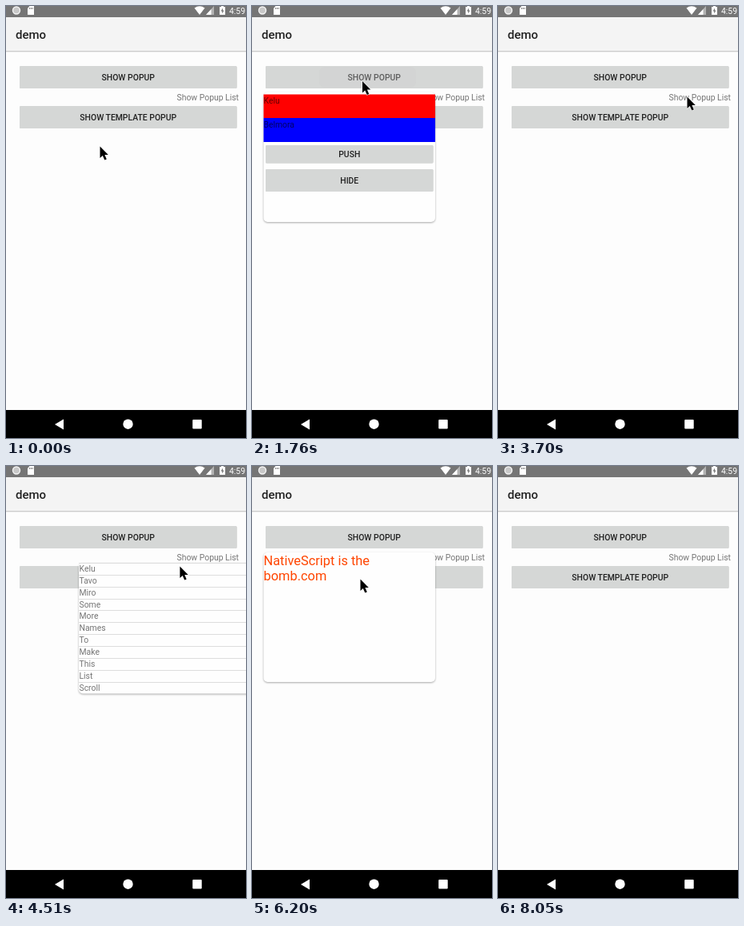
Animation of 300x540 px, one loop 8.15 s. Source, as an HTML page:

```html
<!DOCTYPE html>
<html lang="en">
<head>
<meta charset="utf-8">
<title>Popup demo</title>
<style>
  html, body { margin: 0; width: 100%; height: 100%; overflow: hidden; background: #fdfdfd; }
  svg { display: block; width: 300px; height: 540px; font: 10.4px Roboto, sans-serif; }
  .button rect { fill: #d5d7d6; filter: drop-shadow(0 .5px .5px #0003); }
  .button text { font-weight: 500; text-anchor: middle; fill: #212121; }
  .pressed rect { fill: #d0d1d1; filter: drop-shadow(0 2px 1.5px #0006); }
  .label { fill: #757575; }
  .tinted { fill: #000; opacity: .6; }
  .card { fill: #fefefe; filter: drop-shadow(0 1px 1px #0005); }
</style>
</head>
<body>
<svg viewBox="0 0 300 540">
  <rect width="300" height="540" fill="#fdfdfd"/>
  <rect y="56" width="300" height="1" fill="#ccc"/>
  <rect y="57" width="300" height="1" fill="#ececec"/>
  <rect y="14" width="300" height="42" fill="#f4f4f4"/>
  <text x="12" y="41" font-size="15" font-weight="500" fill="#212121">demo</text>

  <g id="status" fill="#fff">
    <rect width="300" height="14" fill="#757575"/>
    <circle cx="13" cy="5.5" r="4.5" fill="#c8c8c8" stroke="#f4f4f4" stroke-width="1.4"/>
    <path d="M29.5 0H35V11H27V3Z"/>
    <path d="M29.6 2V4M31.4 2V4M33.2 2V4" stroke="#757575" stroke-width=".9"/>
    <path d="M235.500 2.500Q242 -2 248.500 2.500L242 11Z"/>
    <path d="M260 0V11H250Z" opacity=".45"/>
    <path d="M256.500 4V11H250Z"/>
    <path d="M269 0H272V1H274V11H267V1H269Z"/>
    <path d="M271 2.500L268.700 6.500H270.200V9.500L272.500 5.500H271Z" fill="#757575"/>
    <text x="279" y="9.700">4:59</text>
  </g>

  <g id="page"></g>
  <rect id="ripple" x="84" y="76" width="121" height="26" rx="7" fill="#cdcdcd" opacity=".35"/>

  <g id="colors">
    <rect class="card" x="14.500" y="108" width="214.500" height="162" rx="5"/>
    <path d="M14.500 110.500H229V140H14.500Z" fill="#f00"/>
    <path d="M14.500 140H229V170H14.500Z" fill="#00f"/>
    <text class="tinted" x="14.500" y="121.700">Kelu</text>
    <text class="tinted" x="14.500" y="151.700">Belmora</text>
  </g>

  <g id="list"><rect class="card" x="91" y="121" width="220" height="163.500" rx="5"/></g>

  <g id="template">
    <rect class="card" x="14.500" y="108" width="214.500" height="162" rx="5"/>
    <g font-size="16.400" fill="#ff4500">
      <text x="14.500" y="124">NativeScript is the</text>
      <text x="14.500" y="143">bomb.com</text>
    </g>
  </g>

  <path id="cursor" d="M0 0V14.500L3.300 11.500L5.800 17L8.300 16L5.900 10.500H10.300Z"
    stroke="#fff" stroke-width="1.200" paint-order="stroke"/>

  <g id="nav" fill="#fff">
    <rect y="505" width="300" height="35" fill="#000"/>
    <path d="M61 523L72 516.500V529.500Z"/>
    <circle cx="152.500" cy="522.700" r="6.200"/>
    <rect x="233.200" y="517" width="11.500" height="11.500" rx="1"/>
  </g>
</svg>
<script>
const LOOP = 8150;
const el = id => document.getElementById(id);
const add = (id, markup) => el(id).insertAdjacentHTML('beforeend', markup);

function addButton(parent, id, text, y, right, height) {
  add(parent, `<g class="button" id="${id}">
    <rect x="17" y="${y}" width="${right - 17}" height="${height}" rx="1.5"/>
    <text x="${(17 + right) / 2}" y="${y + height / 2 + 3.8}">${text}</text></g>`);
}
addButton('page', 'show', 'SHOW POPUP', 75, 288.5, 28);
addButton('page', 'showTemplate', 'SHOW TEMPLATE POPUP', 125, 288.5, 28);
add('page', '<text class="label" x="291" y="118" text-anchor="end">Show Popup List</text>');
addButton('colors', 'push', 'PUSH', 174, 226.5, 22.5);
addButton('colors', 'hide', 'HIDE', 204, 226.5, 28);

'Kelu Tavo Miro Some More Names To Make This List Scroll'.split(' ').forEach((word, i) => {
  const y = 121 + i * 14.87;
  add('list', `<path d="M91 ${Math.round(y) + .5}H300" stroke="#ddd"/>
    <text class="label" x="91.5" y="${y + 10.9}">${word}</text>`);
});

// Stepped progress: n equal jumps, the first at start and the last at end
function progress(t, [start, end, n]) {
  if (t < start) return 0;
  return Math.min(n, Math.floor((t - start) / (end - start) * (n - 1) + .02) + 1) / n;
}

const popups = {
  colors: [[1590, 1760, 3], [3000, 3080, 2]],
  list: [[4150, 4240, 2], [5040, 5130, 2]],
  template: [[6020, 6200, 3], [7010, 7100, 2]]
};
const presses = { show: [1150, 1590], hide: [2910, 3080], showTemplate: [5670, 6020] };
const moves = [ // start, end, steps, x, y
  [260, 520, 4, 138, 94],
  [1930, 2640, 9, 126.500, 211.500],
  [3260, 3700, 6, 236.500, 113.500],
  [4330, 4680, 5, 207, 132],
  [5130, 5490, 5, 135.500, 141.500],
  [6380, 6650, 4, 265, 196],
  [6830, 6831, 1, 264.500, 197],
  [7280, 7820, 7, 284, 541]
];

function cursorAt(t) {
  let x = 117.500, y = 175.500;
  for (const [start, end, n, toX, toY] of moves) {
    const p = progress(t, [start, end, n]), eased = p * p * (3 - 2 * p);
    x += (toX - x) * eased;
    y += (toY - y) * eased;
  }
  return [x, y];
}

function draw(now) {
  const t = now % LOOP;
  for (const id in popups) {
    const [enter, leave] = popups[id];
    el(id).setAttribute('opacity', progress(t, enter) - progress(t, leave));
  }
  for (const id in presses) {
    const [down, up] = presses[id];
    el(id).classList.toggle('pressed', t >= down && t < up);
  }
  el('ripple').style.display = t >= 1590 && t < 1930 ? '' : 'none';
  el('cursor').setAttribute('transform', `translate(${cursorAt(t)})`);
  requestAnimationFrame(() => draw(performance.now()));
}
draw(performance.now());
</script>
</body>
</html>
```
